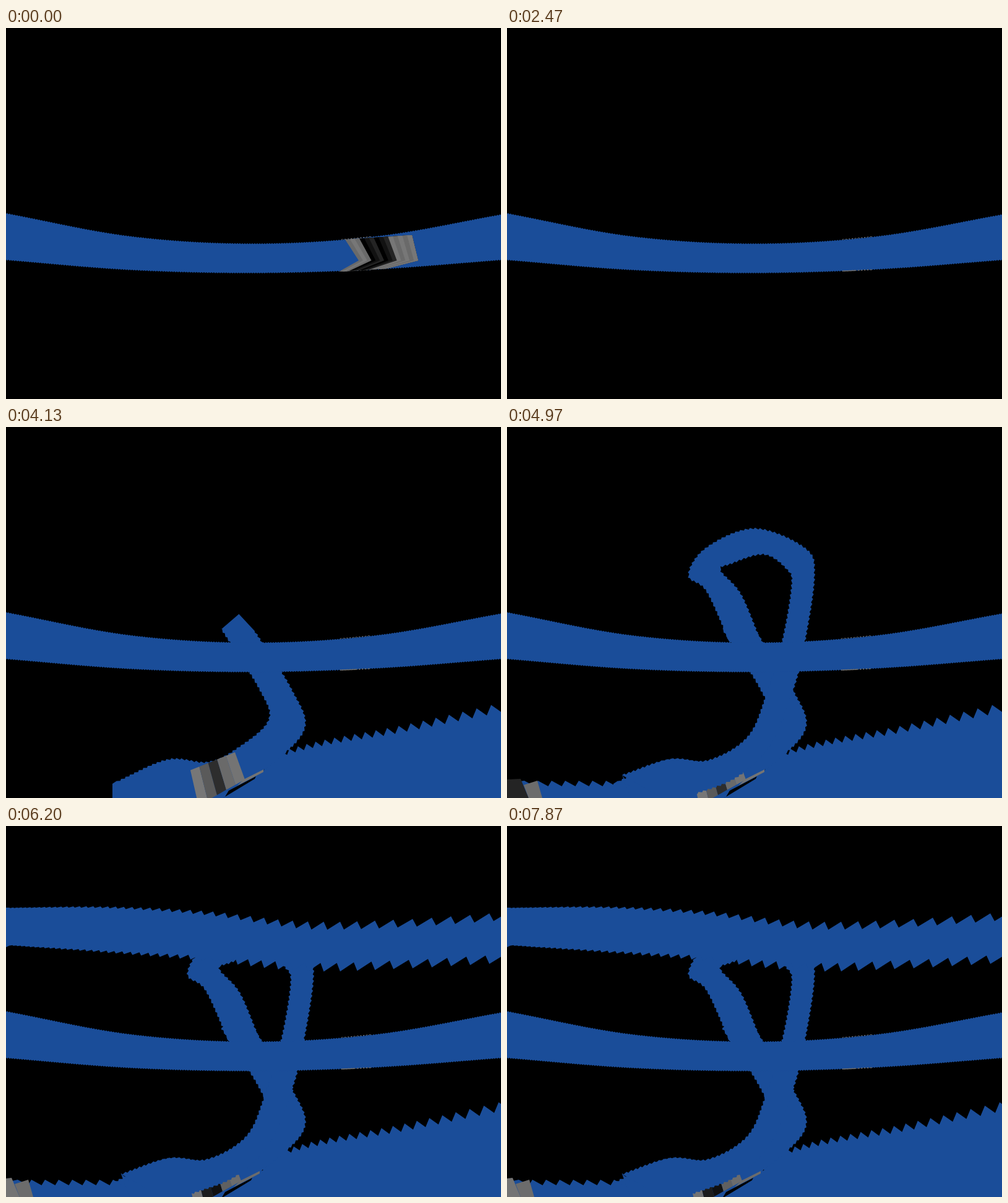
Write an HTML page with a canvas that moves like this. It is 800 px wide and 600 px high and loops after 8000 ms.

```html
<!DOCTYPE html>
<html>
<head>
<meta charset="utf-8">
<style>
html, body { margin: 0; width: 100%; height: 100%; overflow: hidden; background: #000; }
canvas { display: block; }
</style>
</head>
<body>
<canvas id="c" width="800" height="600"></canvas>
<script>
const g = document.getElementById('c').getContext('2d');
const BLUE = '#1a4d99', LOOP = 8000, STEP = 37.5, REST = 7870;
const span = (t, a, b) => Math.max(0, Math.min(1, (t - a) / (b - a)));
const mix = (a, b, f) => a + (b - a) * f;
const grey = v => `rgb(${v},${v},${v})`;

// Two buffers are shown in turn, each with its own tooth phase.
function heldStep(t) {
  const n = Math.floor((Math.min(t, REST) - 1.25) / STEP);
  return { time: Math.max(0, n * STEP + 1.25), odd: Math.abs(n % 2) };
}

function trace(points) {
  g.beginPath();
  points.forEach(([x, y]) => g.lineTo(x, y));
  g.closePath();
}

function fill(points, color = BLUE) {
  g.fillStyle = color;
  trace(points);
  g.fill();
}

function clipped(points, draw) {
  g.save();
  trace(points);
  g.clip();
  draw();
  g.restore();
}

// Catmull-Rom through evenly spaced values, with straight ends.
function spline(v, u) {
  const last = v.length - 1;
  const i = Math.max(0, Math.min(last - 1, Math.floor(u))), f = u - i;
  const b = v[i], c = v[i + 1];
  const a = i > 0 ? v[i - 1] : 2 * b - c;
  const d = i + 2 <= last ? v[i + 2] : 2 * c - b;
  return b + f * (c - a + f * (2 * a - 5 * b + 4 * c - d + f * (3 * (b - c) + d - a))) / 2;
}
const curve = (values, x0, gap) => x => spline(values, (x - x0) / gap);

// Sawtooth along a horizontal edge; gap and depth may grow with x.
function saw(edge, x, end, gap, depth, skew, odd) {
  const out = [];
  x += odd * gap(x) / 2;
  while (x < end) {
    const w = gap(x), v = x + w * skew;
    out.push([x, edge(x)], [v, edge(v) + depth(w)]);
    x += w;
  }
  return out;
}

// Notches along any polyline, cut towards the given side.
function jag(pts, gap, depth, side, odd) {
  const out = [pts[0]];
  let next = gap * (odd ? 0.5 : 1), cut = false, done = 0;
  for (let i = 1; i < pts.length; i++) {
    const [ax, ay] = pts[i - 1], [bx, by] = pts[i];
    const len = Math.hypot(bx - ax, by - ay) || 0.001;
    while (next <= done + len) {
      const f = (next - done) / len, d = (cut ? 0.5 : -0.5) * depth * side / len;
      out.push([mix(ax, bx, f) - (by - ay) * d, mix(ay, by, f) + (bx - ax) * d]);
      next += gap * (cut ? 0.3 : 0.7);
      cut = !cut;
    }
    done += len;
  }
  out.push(pts[pts.length - 1]);
  return out;
}

// Each rail row holds a left point and a right point.
function ribbon(rails, p, odd, cap) {
  if (p <= 0) return;
  const column = k => rails.map(r => r[k]);
  const cols = [0, 1, 2, 3].map(column), end = p * (rails.length - 1);
  const left = [], right = [], n = Math.ceil(end * 10);
  for (let i = 0; i <= n; i++) {
    const [lx, ly, rx, ry] = cols.map(c => spline(c, Math.min(i / 10, end)));
    left.push([lx, ly]);
    right.push([rx, ry]);
  }
  const [lx, ly] = left[n], [rx, ry] = right[n];
  const tip = cap ? [[(lx + rx) / 2 + (ry - ly) * 0.48, (ly + ry) / 2 - (rx - lx) * 0.48]] : [];
  fill([...jag(left, 8, 2.5, 1, odd), ...tip, ...jag(right, 8, 2.5, -1, odd).reverse()]);
}

const bandTop = curve([299, 336, 348, 336, 301], 0, 200);
const bandLow = curve([376, 392, 397, 391, 376], 0, 200);
const nearTop = curve([570, 514, 482, 446], 320, 160);
const highTop = curve([132, 130, 137, 154, 151, 140], 0, 160);
const highLow = curve([193, 205, 218, 235, 231, 222], 0, 160);

const CLIMB = [
  [172, 577, 172, 605], [260, 538, 300, 605], [325, 542, 352, 600], [370, 522, 416, 556],
  [424, 475, 482, 490], [410, 425, 462, 425], [348, 327, 402, 330]
];
const TURN = [
  [360, 348, 411, 348], [322, 265, 378, 270], [293, 240, 345, 232], [322, 195, 360, 222],
  [400, 164, 415, 206], [482, 196, 452, 230], [497, 240, 460, 255], [482, 345, 445, 345],
  [463, 424, 418, 436], [425, 515, 388, 502], [372, 566, 325, 539], [308, 592, 260, 538],
  [260, 605, 186, 563]
];

function drawBand(odd) {
  const fine = () => 4;
  fill([...saw(bandTop, -4, 804, fine, () => 1.5, 0.5, odd),
    ...saw(bandLow, -4, 804, fine, () => -1.5, 0.5, odd).reverse()]);
  g.fillStyle = '#707070';
  for (let x = 540 + odd * 2; x < 590; x += 5) {
    g.fillRect(x, bandTop(x) - 0.5, 2.5, 1);
    g.fillRect(x, bandLow(x) - 1.5, x < 562 ? 5 : 2.5, 1.5);
  }
}

// Light, dark, then light strips, worn away from the left.
function drawChevron(t) {
  const wiped = span(t, 100, 450), count = 14;
  const side = f => [[548 + 108 * f, 342 - 7 * f], [570 + 96 * f, 376], [538 + 77 * f, 394 - 5 * f]];
  for (let i = 0; i < count; i++) {
    const f = i / count;
    if (f + 1 / count <= wiped) continue;
    const dark = f > 0.18 && f < 0.62;
    const tone = dark ? (i % 3) * 18 : 106 + (i % 2) * 13;
    fill([...side(Math.max(f, wiped)), ...side(1).reverse()], grey(tone));
  }
}

function drawNear(t, odd) {
  const x = mix(810, 340, span(t, 2950, 3560));
  if (x > 800) return;
  const teeth = saw(nearTop, 445, 830, v => 0.0327 * v - 1.4, w => w * 0.65, 0.7, odd);
  clipped([[x, 0], [800, 0], [800, 600], [x, 600]], () =>
    fill([[350, 600], [416, 556], [425, 541], ...teeth, [830, 600]]));
}

function drawGrille(t, odd) {
  if (t < 3850) return;
  const tones = odd ? [115, 28, 16, 96, 108] : [119, 90, 45, 106, 116];
  const rib = f => [[298 + 72 * f, 555 - 29 * f], [311 + 75 * f, 612 - 42 * f]];
  g.save();
  g.translate(-6 * odd, 4 * odd);
  fill([[354, 598], [360, 588], [404, 565], [402, 569]], '#000');
  tones.forEach((v, i) => fill([...rib(i / 5), ...rib((i + 1) / 5).reverse()], grey(v)));
  fill([[384, 570], [416, 554], [416, 558], [374, 580]], grey(tones[4]));
  g.restore();
}

function drawTail(t, odd) {
  const x0 = mix(200, -20, span(t, 4850, 4940));
  if (x0 >= 200) return;
  const teeth = saw(() => 572, 28 - odd * 20, 200, () => 22, () => 9, 0.75, odd);
  clipped([[x0, 500], [200, 500], [200, 600], [x0, 600]], () =>
    fill([[0, 600], [0, 576], ...teeth, [186, 563], [200, 600]]));
  if (t < 4930) return;
  const x = -odd * 13;
  fill([[0, 570], [22 + x, 569], [35 + x, 600], [0, 600]], odd ? '#747474' : '#242424');
  fill([[27 + x, 579], [49 + x, 572], [57 + x, 600], [35 + x, 600]], '#6c6c6c');
}

function drawHigh(t, odd) {
  const x = (t - 5420) * 1.056;
  if (x <= 0) return;
  const gap = v => Math.min(31, 6 + 0.04 * v);
  const top = saw(highTop, 2.4, 850, gap, w => Math.min(13, 0.02 * w * w), 0.22, odd);
  const low = saw(highLow, 2.4, 850, gap, w => -Math.min(14, 0.025 * w * w), 0.8, odd);
  clipped([[-90, 0], [x - 61, 0], [x + 59, 300], [-90, 300]], () =>
    fill([[0, 132], ...top, ...low.reverse(), [0, 196]]));
}

function draw(now) {
  const { time: t, odd } = heldStep(now % LOOP);
  g.fillStyle = '#000';
  g.fillRect(0, 0, 800, 600);
  drawNear(t, odd);
  ribbon(CLIMB, span(t, 3650, 4125), odd, true);
  drawGrille(t, odd);
  ribbon(TURN, span(t, 4130, 4850), odd, t < 4530);
  drawTail(t, odd);
  drawHigh(t, odd);
  drawBand(odd);
  drawChevron(t);
}

const start = performance.now();
function tick() {
  draw(performance.now() - start);
  requestAnimationFrame(tick);
}
tick();
</script>
</body>
</html>
```
